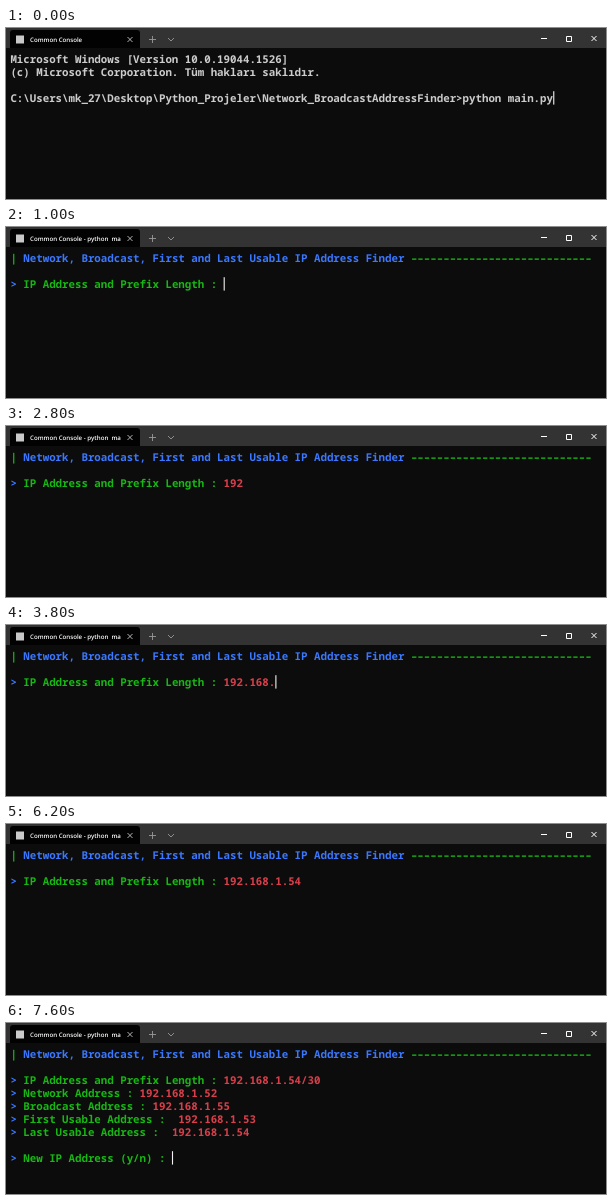
Recreate the animation shown at these times as an HTML page. Size 600 by 171 pixels, loop 8000 ms.

```html
<!DOCTYPE html>
<html lang="en">
<head>
<meta charset="utf-8">
<title>Address finder in a terminal</title>
<style>
  html, body { margin: 0; width: 100%; height: 100%; overflow: hidden; background: #0c0c0c; }
  svg { display: block; text-rendering: geometricPrecision; }
  text { white-space: pre; }
  #title { font: 600 6.15px "Open Sans", sans-serif; fill: #fff; }
  #screen { font: 600 10.77px "Noto Sans Mono", monospace; font-variant-ligatures: none; }
  .w { fill: #cccccc; }
  .g { fill: #18b814; }
  .b { fill: #3b78ff; }
  .r { fill: #d83f4b; }
  .icons path { fill: none; }
</style>
</head>
<body>
<svg width="600" height="171" viewBox="0 0 600 171">
  <rect width="600" height="171" fill="#0c0c0c"/>
  <rect width="600" height="20" fill="#333"/>
  <path d="M4 20V5q0-3 3-3H131q3 0 3 3V20z" fill="#020202"/>
  <rect x="10" y="7.5" width="8" height="8" fill="#c8c8c8"/>
  <clipPath id="tab"><rect width="115" height="20"/></clipPath>
  <text id="title" x="24" y="14" clip-path="url(#tab)"></text>
  <g class="icons">
    <path d="M121.5 9l5 5m0-5l-5 5" stroke="#ddd" stroke-width=".8"/>
    <path d="M143 11.5h7m-3.5-3.5v7M162 10l3 3 3-3" stroke="#999" stroke-width=".9"/>
    <path d="M535 10.5h6M560.5 8.5h5v5h-5zM585.5 8l5 5m0-5l-5 5" stroke="#fff"/>
  </g>
  <g id="screen"></g>
  <rect id="cursor" width="1.1" height="13.4" fill="#f2f2f2"/>
</svg>
<script>
const LOOP = 8000, LEFT = 4.4, CELL = 6.462, TOP = 24.5, ROW = 13;
const $ = id => document.getElementById(id);

const span = (color, text) => `<tspan class="${color}">${text}</tspan>`;
const field = (label, value) => span('b', '&gt; ') + span('g', label) + span('r', value);

const shell = [
  span('w', 'Microsoft Windows [Version 10.0.19044.1526]'),
  span('w', '(c) Microsoft Corporation. Tüm hakları saklıdır.'),
  '',
  span('w', 'C:\\Users\\mk_27\\Desktop\\Python_Projeler\\Network_BroadcastAddressFinder&gt;python main.py')
];
const header = span('g', '| ') +
  span('b', 'Network, Broadcast, First and Last Usable IP Address Finder ') +
  span('g', '–'.repeat(28));
const ask = typed => [header, '', field('IP Address and Prefix Length : ', typed)];
const results = [
  field('Network Address : ', '192.168.1.52'),
  field('Broadcast Address : ', '192.168.1.55'),
  field('First Usable Address :  ', '192.168.1.53'),
  field('Last Usable Address :  ', '192.168.1.54'),
  '',
  field('New IP Address (y/n) : ', '')
];

// Start time and number of typed characters
const address = '192.168.1.54/30';
const keys = [
  [2000, 1], [2200, 2], [2400, 3], [3000, 4], [3200, 6], [3400, 7], [3800, 8],
  [4000, 9], [5200, 10], [5400, 11], [5600, 12], [6400, 13], [6600, 14], [6800, 15]
];
const hidden = [[400, 800], [1800, 2000], [2800, 3000], [4600, 5200], [6200, 6400], [7400, 7600]];

function sceneAt(t) {
  if (t < 800) return { lines: shell, col: 84, row: 3 };
  if (t < 1000) return { lines: shell, col: 0, row: 4 };
  const count = keys.reduce((n, [start, size]) => t >= start ? size : n, 0);
  const lines = ask(address.slice(0, count));
  return t < 7600
    ? { lines, col: 33 + count, row: 2 }
    : { lines: lines.concat(results), col: 25, row: 8 };
}

let shown = '';
function draw(now) {
  const t = now % LOOP;
  const { lines, col, row } = sceneAt(t);
  const markup = lines.map((line, i) =>
    `<text x="${LEFT}" y="${TOP + i * ROW + 10.2}">${line}</text>`).join('');
  if (markup !== shown) $('screen').innerHTML = shown = markup;
  $('title').textContent = 'Common Console' + (t < 800 ? '' : ' - python  main.py');
  $('cursor').setAttribute('x', LEFT + col * CELL);
  $('cursor').setAttribute('y', TOP + row * ROW - .3);
  $('cursor').style.display = hidden.some(([a, b]) => t >= a && t < b) ? 'none' : '';
  requestAnimationFrame(draw);
}
draw(performance.now());
</script>
</body>
</html>
```
